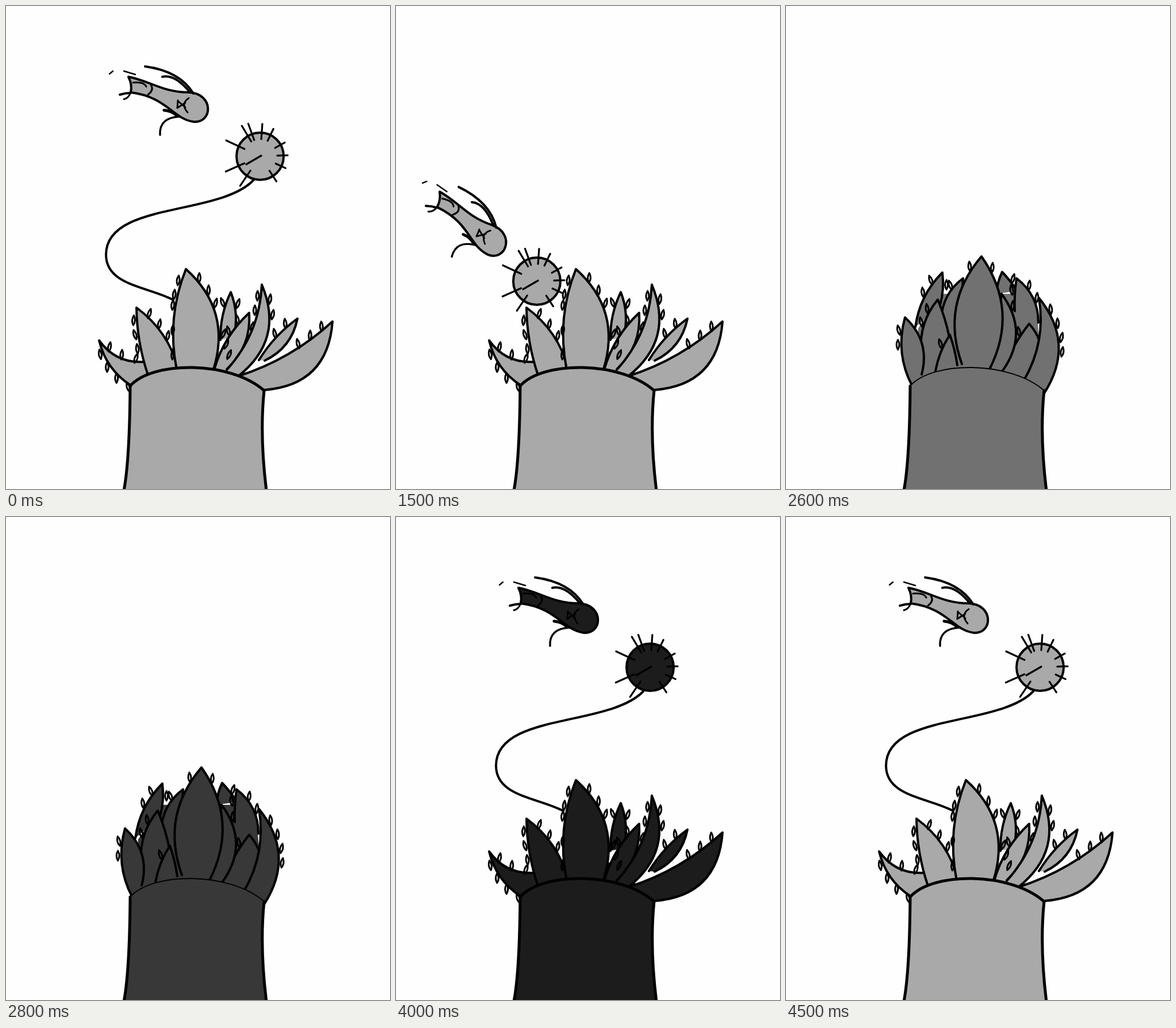
An HTML page with a canvas for the animation above (4.6 s loop, 668x839 px).

```html
<!DOCTYPE html>
<html lang="en">
<head>
<meta charset="utf-8">
<title>Lure</title>
<style>
html, body { margin: 0; width: 100%; height: 100%; overflow: hidden; background: #fefefe; }
canvas { display: block; }
</style>
</head>
<body>
<canvas id="stage" width="668" height="839"></canvas>
<script>
const ctx = document.getElementById('stage').getContext('2d');
const LOOP = 4600, GRAY = 169, RAD = Math.PI / 180;

let seed = 1;
function rand() {
  seed = seed * 16807 % 2147483647;
  return seed / 2147483647;
}

// A line, quadratic or cubic, depending on how many coordinates follow the start.
function curve(x, y, ...rest) {
  ctx.lineTo(x, y);
  if (rest.length === 2) ctx.lineTo(...rest);
  else if (rest.length === 4) ctx.quadraticCurveTo(...rest);
  else ctx.bezierCurveTo(...rest);
}

function stroke(width, ...p) {
  ctx.beginPath();
  curve(...p);
  ctx.lineWidth = width;
  ctx.stroke();
}

function fillPoly(...points) {
  ctx.beginPath();
  points.forEach(p => ctx.lineTo(...p));
  ctx.fill();
}

function bristle(x, y, tilt) {
  ctx.save();
  ctx.translate(x, y);
  ctx.rotate(tilt);
  ctx.beginPath();
  ctx.moveTo(0, 8);
  ctx.quadraticCurveTo(-5, 0, 0, -9);
  ctx.quadraticCurveTo(5, 0, 0, 8);
  ctx.lineWidth = 3;
  ctx.stroke();
  ctx.restore();
}

// One side of a petal; a positive bulge bows outwards, side is 1 (left) or -1 (right).
function edge([bx, by], [tx, ty], bulge, side) {
  const dx = tx - bx, dy = ty - by, len = Math.hypot(dx, dy);
  const nx = side * dy, ny = -side * dx;
  const cx = (bx + tx) / 2 + nx * bulge, cy = (by + ty) / 2 + ny * bulge;
  const mix = (a, c, b, t) => a * (1 - t) ** 2 + 2 * c * t * (1 - t) + b * t * t;
  return {
    cx, cy,
    grow(count) {
      for (let i = 0; i < count; i++) {
        const t = 1 - (i + 0.85) * 25 / len;
        bristle(mix(bx, cx, tx, t) + nx / len * 6, mix(by, cy, ty, t) + ny / len * 6,
          (rand() - 0.5) * 0.5 - side * 0.1);
      }
    }
  };
}

// Base left, tip, base right, bulges and bristle counts for both sides.
function petal(left, tip, right, [bulgeL, bulgeR], [countL, countR]) {
  const l = edge(left, tip, bulgeL, 1), r = edge(right, tip, bulgeR, -1);
  ctx.beginPath();
  ctx.moveTo(...left);
  ctx.quadraticCurveTo(l.cx, l.cy, ...tip);
  ctx.quadraticCurveTo(r.cx, r.cy, ...right);
  ctx.fill();
  ctx.lineWidth = 4;
  ctx.stroke();
  l.grow(countL);
  r.grow(countR);
}

function trunk(rim) {
  const left = [205, 842, 215, 790, 216, 660];
  const top = [216, 660, 255, 616, 390, 616, 449, 668];
  const right = [449, 668, 441, 745, 453, 842];
  ctx.beginPath();
  [left, top, right].forEach(p => curve(...p));
  ctx.fill();
  stroke(5, ...left);
  stroke(5, ...right);
  stroke(rim, ...top);
}

function openPlant() {
  seed = 7;
  fillPoly([217, 659], [240, 617], [300, 600], [380, 600], [420, 640]);
  petal([373, 580], [391, 497], [396, 575], [.12, .16], [1, 1]);
  petal([362, 632], [423, 533], [384, 631], [.14, .24], [2, 1]);
  petal([440, 615], [507, 543], [450, 616], [.1, .25], [2, 0]);
  petal([384, 632], [445, 484], [404, 643], [-.18, .38], [2, 2]);
  petal([404, 643], [568, 548], [449, 667], [-.11, .43], [3, 0]);
  petal([217, 659], [162, 581], [242, 618], [.2, -.28], [4, 3]);
  petal([247, 641], [227, 524], [300, 632], [.08, .18], [3, 4]);
  petal([297, 632], [313, 457], [361, 631], [.15, .32], [2, 3]);
  // Loose bristles at the inner bases.
  for (let i = 0; i < 3; i++) {
    bristle(290, 520 + i * 43, 0.1);
    bristle(378 + i * 5, 570 + i * 18, 0.4);
  }
  trunk(5);
}

function closedPlant() {
  seed = 11;
  fillPoly([220, 661], [230, 560], [270, 500], [400, 500], [436, 530], [449, 672]);
  petal([225, 558], [272, 463], [268, 520], [.17, .1], [2, 1]);
  petal([270, 545], [308, 473], [295, 530], [.24, .1], [1, 0]);
  petal([366, 500], [376, 462], [402, 495], [.1, .05], [0, 1]);
  petal([398, 530], [401, 473], [439, 550], [.05, .25], [1, 2]);
  petal([235, 600], [264, 510], [284, 575], [.2, .05], [2, 0]);
  petal([220, 661], [207, 541], [236, 640], [.2, .3], [2, 0]);
  petal([260, 634], [285, 571], [298, 624], [.1, .05], [1, 0]);
  petal([376, 636], [423, 552], [441, 582], [.08, .1], [3, 0]);
  petal([355, 630], [375, 500], [375, 636], [0, .37], [0, 1]);
  petal([414, 650], [440, 507], [449, 673], [-.18, .36], [0, 4]);
  petal([306, 622], [340, 435], [354, 631], [.29, .3], [1, 1]);
  trunk(2);
}

function ball(x, y) {
  ctx.save();
  ctx.translate(x, y);
  ctx.beginPath();
  ctx.arc(0, 0, 41, 0, 7);
  ctx.fill();
  ctx.lineWidth = 4;
  ctx.stroke();
  // Spines cross the rim and reach further out on the left.
  for (const deg of [25, 57, 124, 156, 205, 239, 250, 274, 296, 331, 358]) {
    const c = Math.cos(deg * RAD), s = Math.sin(deg * RAD), out = 57 - 9 * c;
    stroke(3.2, c * 30, s * 30, c * out, s * out);
  }
  stroke(3.2, -24, 14, 2, -1);
  ctx.restore();
}

// Drawn around the eye.
function fish(x, y, tilt) {
  ctx.save();
  ctx.translate(x, y);
  ctx.rotate(tilt * RAD);
  ctx.translate(-303, -170);
  ctx.beginPath();
  curve(213, 123, 250, 130, 273, 150, 318, 150);
  curve(318, 150, 362, 152, 360, 204, 326, 201);
  curve(326, 201, 290, 196, 280, 158, 217, 150);
  curve(217, 150, 220, 137, 213, 123);
  ctx.fill();
  ctx.lineWidth = 4;
  ctx.stroke();
  // Tail
  stroke(3, 252, 137, 258, 146, 247, 154);
  stroke(3, 221, 133, 240, 131, 244, 140);
  stroke(4, 217, 151, 208, 151, 198, 154);
  stroke(3, 216, 152, 213, 160, 205, 162);
  stroke(2.4, 180, 118, 186, 113);
  stroke(2.4, 205, 113, 225, 119);
  // Fins
  stroke(4, 242, 105, 302, 113, 326, 152);
  stroke(4, 272, 123, 294, 118, 320, 150);
  stroke(5, 275, 181, 288, 182, 298, 191);
  stroke(3.4, 302, 192, 266, 194, 268, 224);
  // Eye
  stroke(2.8, 299, 164, 298, 177);
  stroke(2.8, 298, 177, 312, 168);
  stroke(2.8, 299, 165, 312, 176);
  stroke(2.8, 318, 160, 303, 170, 316, 185);
  ctx.restore();
}

function stalk(x, y) {
  stroke(4, 290, 510, 245, 487, 174, 485, 174, 432);
  stroke(4, 174, 432, 174, 340, x - 72, 365, x - 12, y + 42);
}

const poses = [
  { ball: [442, 261], fish: [303, 170, 0] },
  { ball: [567, 330], fish: [428, 243, 0] },
  { ball: [343, 395], fish: [227, 299, 18] },
  { ball: [245, 478], fish: [147, 395, 18] }
];

function hunt(pose) {
  if (pose.ball[1] < 450) stalk(...pose.ball);
  ball(...pose.ball);
  openPlant();
  fish(...pose.fish);
}

function render(t) {
  ctx.fillStyle = '#fefefe';
  ctx.fillRect(0, 0, 668, 839);
  if (t >= 3000 && t < 4000) return;

  // The fill darkens in sixths before vanishing and brightens again on return.
  let level = 6;
  if (t >= 4000) level = Math.floor((t - 4000) / 100) + 1;
  else if (t >= 2500) level = 5 - Math.floor((t - 2500) / 100);
  const g = Math.round(GRAY * level / 6);
  ctx.fillStyle = `rgb(${g},${g},${g})`;
  ctx.strokeStyle = '#000';
  ctx.lineCap = ctx.lineJoin = 'round';

  if (t >= 2000 && t < 3000) closedPlant();
  else hunt(poses[t >= 4000 ? 0 : Math.floor(t / 500)]);
}

const start = performance.now();
function tick() {
  render((performance.now() - start) % LOOP);
  requestAnimationFrame(tick);
}
tick();
</script>
</body>
</html>
```
